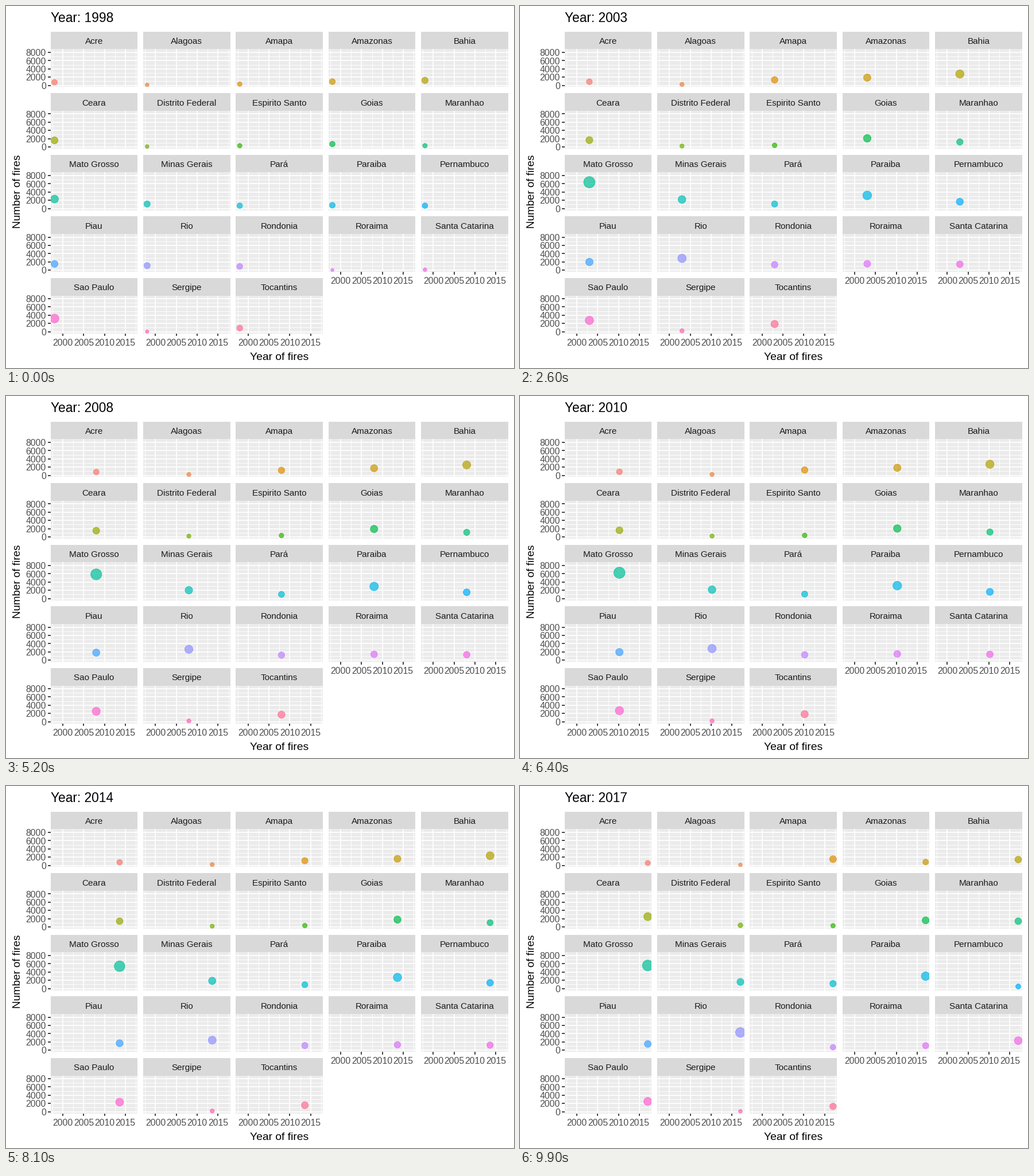
Animation of 885x632 px, one loop 10000 ms. Source, as a matplotlib script:

```python
import numpy as np
import matplotlib.pyplot as plt
from matplotlib.animation import FuncAnimation
from matplotlib.patches import Circle, Rectangle

W, H, DPI = 885, 632, 100
PT = 72 / DPI                      # points per pixel
STEPS = 100
FIRST, LAST = 1998, 2017
SPAN = LAST - FIRST

# Panel grid, in pixels
COLS = 5
LEFT, TOP = 77.6, 44.7
PITCH_X, PITCH_Y = 161.35, 107.55
PANEL_W, STRIP_H, PANEL_H = 151.7, 30.6, 66.1
ZERO_Y, PX_PER_FIRE = 93.8, 0.0072
X_FIRST, PX_PER_YEAR = 6.9, 7.27
TICK = 4.7
MAX_FIRES = 8360

# Hundreds of fires: first year, typical middle year, last year
STATES = {
    "Acre": (7.5, 8, 5.6), "Alagoas": (1, 2, 1), "Amapa": (3, 12, 15),
    "Amazonas": (9, 17, 8), "Bahia": (12, 25, 14), "Ceara": (16, 15, 25),
    "Distrito Federal": (1, 2, 4), "Espirito Santo": (3, 3.5, 3),
    "Goias": (7, 19, 16), "Maranhao": (3, 11, 14),
    "Mato Grosso": (23, 58, 56), "Minas Gerais": (11, 20, 16),
    "Pará": (7, 10, 12), "Paraiba": (8, 29, 30), "Pernambuco": (7, 15, 5),
    "Piau": (15, 18, 15), "Rio": (11, 26, 43), "Rondonia": (9, 12, 7),
    "Roraima": (0.2, 14, 11), "Santa Catarina": (1, 13, 23),
    "Sao Paulo": (32, 25, 25), "Sergipe": (0.4, 2, 1),
    "Tocantins": (9, 17, 13),
}

# Each year is reached on a whole step
year_steps = np.round((STEPS - 1) * np.arange(SPAN + 1) / SPAN)
years = np.interp(np.arange(STEPS), year_steps, np.arange(FIRST, LAST + 1))


def curve(first, mid, last):
    """Rise to the middle level, swing around it, then move to the end."""
    def along(*points):
        return np.interp(years, (FIRST, 2003, 2014, LAST), points)

    swing = 0.1 * np.cos(2 * np.pi * (years - 2003) / 6.5)
    return 100 * along(first, mid, mid, last) * (1 + swing * along(0, 1, 1, 0))


def hcl(hue, chroma=100, lum=65):
    """Polar LUV colour to clipped sRGB."""
    h = np.radians(hue)
    y = ((lum + 16) / 116) ** 3
    u = chroma * np.cos(h) / (13 * lum) + 0.1978398
    v = chroma * np.sin(h) / (13 * lum) + 0.4683363
    x = 9 * y * u / (4 * v)
    z = -x / 3 - 5 * y + 3 * y / v
    lin = np.clip([3.240479 * x - 1.537150 * y - 0.498535 * z,
                   -0.969256 * x + 1.875992 * y + 0.041556 * z,
                   0.055648 * x - 0.204043 * y + 1.057311 * z], 0, 1)
    rgb = np.where(lin > 0.00304, 1.055 * lin ** (1 / 2.4) - 0.055, 12.92 * lin)
    return tuple(np.clip(rgb, 0, 1))


def radius(fires):
    size = 1 + 5 * np.sqrt(fires / MAX_FIRES)
    return 1.73 * size + 0.57


plt.rcParams["font.family"] = "Liberation Sans"
plt.rcParams["path.simplify"] = False
fig = plt.figure(figsize=(W / DPI, H / DPI), dpi=DPI, facecolor="white")
ax = fig.add_axes([0, 0, 1, 1])
ax.set_xlim(0, W)
ax.set_ylim(H, 0)
ax.axis("off")


def label(x, y, text, px, color="black", ha="center", rotation=0):
    return ax.text(x, y, text, fontsize=px * PT, color=color, ha=ha,
                   va="baseline", rotation=rotation, rotation_mode="anchor")


def box(x, bottom, w, h, color):
    return ax.add_patch(Rectangle((x, bottom), w, -h, fc=color, lw=0, zorder=1))


def strokes(segments, color, px, zorder):
    """Draw many straight segments as one broken line."""
    xs, ys = [], []
    for x0, y0, x1, y1 in segments:
        xs += [x0, x1, np.nan]
        ys += [y0, y1, np.nan]
    ax.plot(xs, ys, color=color, lw=px * PT, solid_capstyle="butt",
            snap=True, zorder=zorder)


def year_x(left, year):
    return left + X_FIRST + (year - FIRST) * PX_PER_YEAR


def fires_y(top, fires):
    return top + ZERO_Y - fires * PX_PER_FIRE


minor, major, ticks, dots = [], [], [], []
for k, (name, levels) in enumerate(STATES.items()):
    row, col = divmod(k, COLS)
    left, top = LEFT + col * PITCH_X, TOP + row * PITCH_Y
    right, panel_top = left + PANEL_W, top + STRIP_H
    bottom = panel_top + PANEL_H

    box(left, panel_top, PANEL_W, STRIP_H, "#D9D9D9")
    panel = box(left, bottom, PANEL_W, PANEL_H, "#EBEBEB")
    label(left + PANEL_W / 2, top + 21.5, name, 15.2, "#1A1A1A")

    for year in np.arange(1997.5, 2018, 2.5):
        x = year_x(left, year)
        (minor if year % 5 else major).append((x, panel_top, x, bottom))
    for fires in range(0, 9000, 1000):
        y = fires_y(top, fires)
        (minor if fires % 2000 else major).append((left, y, right, y))

    if col == 0:
        for fires in range(0, 9000, 2000):
            y = fires_y(top, fires)
            ticks.append((left - TICK, y, left, y))
            label(69.8, y + 6.2, str(fires), 15.8, "#4D4D4D", "right")
    if k + COLS >= len(STATES):
        for year in range(2000, 2020, 5):
            x = year_x(left, year)
            ticks.append((x, bottom, x, bottom + TICK))
            label(x, bottom + 21.2, str(year), 15.8, "#4D4D4D")

    rgb = hcl(15 + 360 * k / len(STATES))
    dot = ax.add_patch(Circle((0, 0), 1, fc=(*rgb, 0.7), ec=(*rgb, 0.7),
                              lw=PT, zorder=4))
    dot.set_clip_path(panel)
    fires = curve(*levels)
    dots.append((dot, year_x(left, years), fires_y(top, fires), radius(fires)))

strokes(minor, "white", 0.9, 2)
strokes(major, "white", 1.8, 3)
strokes(ticks, "#333333", 1.8, 3)

label(475.7, 618.3, "Year of fires", 19.3)
label(25.3, 324.3, "Number of fires", 18.9, rotation=90)
title = label(77.6, 28.3, "", 22.8, ha="left")


def update(i):
    title.set_text(f"Year: {round(FIRST + SPAN * i / (STEPS - 1))}")
    for dot, xs, ys, rs in dots:
        dot.center = xs[i], ys[i]
        dot.set_radius(rs[i])
    return [title] + [d[0] for d in dots]


anim = FuncAnimation(fig, update, frames=STEPS, interval=100,
                     repeat=True, repeat_delay=0, init_func=lambda: update(0))
plt.show()
```
